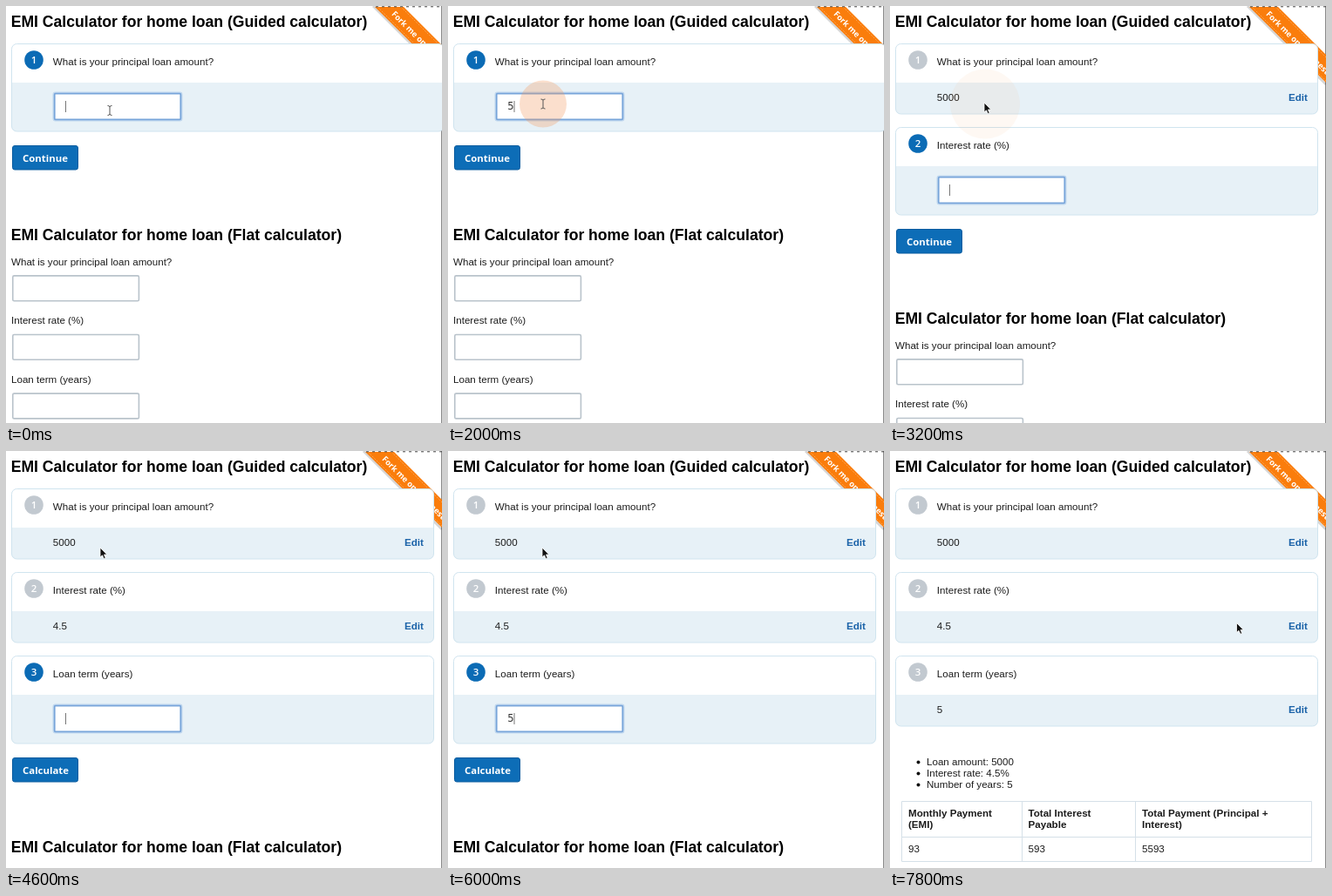
Write an HTML page that moves like this. It is 500 px wide and 479 px high and loops after 8000 ms.

```html
<!DOCTYPE html>
<html lang="en">
<head>
<meta charset="utf-8">
<title>Loan calculator</title>
<style>
  html, body { margin: 0; width: 100%; height: 100%; overflow: hidden; background: #fff; }
  svg { display: block; width: 100%; height: 100%; }
  text { font: 11.6px "Liberation Sans", Arial, sans-serif; fill: #1c1c1c; white-space: pre; }
  .title { font-size: 17.6px; font-weight: 700; fill: #000; }
  .bold { font-weight: 700; }
  .edit { font-weight: 700; fill: #1a62a8; }
  .field { font: 11.5px "DejaVu Sans", sans-serif; fill: #333; }
  .button { font: 700 11.4px "Open Sans", sans-serif; fill: #fff; }
  .badge { font: 600 11.5px "Open Sans", sans-serif; fill: #fff; text-anchor: middle; }
  .ribbon { font: 700 9.3px "Open Sans", sans-serif; fill: #fff; }
</style>
</head>
<body>
<svg id="stage" viewBox="0 0 500 479" xmlns="http://www.w3.org/2000/svg"></svg>
<script>
const LOOP = 8000, TICK = 200, PITCH = 96;
const questions = ["What is your principal loan amount?", "Interest rate (%)", "Loan term (years)"];
const answers = ["5000", "4.5", "5"];
const stepStarts = [0, 3200, 4600, 6400];

// [time, typed text, caret shown]
const typing = [
  [0, "", 1], [600, "", 0], [1200, "", 1], [1600, "", 0], [1800, "", 1],
  [2000, "5", 1], [2200, "50", 1], [2400, "500", 1], [2600, "5000", 1], [3000, "5000", 0],
  [3200, "", 1], [3600, "", 0], [3800, "4", 1], [4000, "4.", 1], [4200, "4.5", 1],
  [4600, "", 1], [5600, "", 0], [6000, "5", 1]
];

const text = (x, y, s, cls = "") => `<text x="${x}" y="${y}" class="${cls}">${s}</text>`;
const rect = (x, y, w, h, attrs) => `<rect x="${x}" y="${y}" width="${w}" height="${h}" ${attrs}/>`;
const path = (d, attrs) => `<path d="${d}" ${attrs}/>`;

function ease(t, from, to) {
  const p = Math.min(1, Math.max(0, (t - from) / (to - from)));
  return p * p * (3 - 2 * p);
}

function ribbon(shift) {
  return `<g transform="translate(${shift} 0)">` +
    path("M421 0 L511 90", 'stroke="#000" stroke-opacity=".16" stroke-width="3"') +
    path("M423 1 H456 L520 65 V97 Z", 'fill="#fa7d0c"') +
    path("M426 1 L520 95 M453 1 L520 68", 'stroke="#ffd3a3" stroke-opacity=".55" stroke-width=".8" stroke-dasharray="2 1.5"') +
    path("M424 .8 H520", 'stroke="#444" stroke-width="1" stroke-dasharray="3 4"') +
    `<text class="ribbon" transform="translate(444 7.5) rotate(45)" dy=".35em">Fork me on Codenest</text></g>`;
}

function panel(i, active, right) {
  const y = 43.5 + i * PITCH, h = active ? 100.5 : 80.5, w = right - 6.5;
  const bottom = y + h, edge = right - 6;
  return rect(6.5, y, w, h, 'rx="6" fill="#fff"') +
    path(`M6.5 ${y + 44.5} H${right} V${bottom - 6} Q${right} ${bottom} ${edge} ${bottom} H12.5 Q6.5 ${bottom} 6.5 ${bottom - 6} Z`, 'fill="#e7f1f7"') +
    rect(6.5, y, w, h, 'rx="6" fill="none" stroke="#d0e4ef"') +
    `<circle cx="32" cy="${y + 18.5}" r="10.8" fill="${active ? "#0b6bb5" : "#c2c9d0"}"/>` +
    text(32, y + 22.6, i + 1, "badge") +
    text(53.8, y + 24, questions[i]) +
    (active ? "" : text(53.8, y + 65.7, answers[i]) + text(457, y + 65.7, "Edit", "edit"));
}

function focusField(i, typed, caret) {
  const y = 100.5 + i * PITCH, x = 68.5 + typed.length * 7.3 + (typed ? .2 : 0);
  return rect(54.5, y - 1, 147, 32, 'rx="2" fill="none" stroke="#a9c9ea" stroke-width="2" stroke-opacity=".6"') +
    rect(55.7, y + .2, 144.6, 29.6, 'rx="1" fill="#fff" stroke="#78a5da" stroke-width="1.8"') +
    text(68.3, y + 18.8, typed, "field") +
    (caret ? path(`M${x} ${y + 8.5} v13`, 'stroke="#777" stroke-width="1"') : "");
}

function button(i, label) {
  const y = 160.5 + i * PITCH;
  return rect(7.5, y, 75, 27.5, 'rx="2.5" fill="#0d6db7" stroke="#0a5c9f"') +
    text(19, y + 18, label, "button");
}

function flatForm(i) {
  const parts = questions.map((q, k) =>
    text(6, 297.8 + k * 67.6, q) +
    rect(7.8, 309.9 + k * 67.6, 144.6, 28.8, 'rx="1.5" fill="#fff" stroke="#b9c3cb" stroke-width="1.6"'));
  return `<g transform="translate(0 ${i * PITCH})">` +
    text(5.7, 268.8, "EMI Calculator for home loan (Flat calculator)", "title") + parts.join("") + "</g>";
}

function results() {
  const bullets = ["Loan amount: 5000", "Interest rate: 4.5%", "Number of years: 5"];
  const columns = [
    [21, "Monthly Payment", "(EMI)", "93"],
    [158.5, "Total Interest", "Payable", "593"],
    [289, "Total Payment (Principal +", "Interest)", "5593"]
  ];
  return bullets.map((b, k) =>
    `<circle cx="32.5" cy="${357.5 + k * 13}" r="2" fill="#111"/>` + text(42, 361 + k * 13, b)).join("") +
    path("M13.5 402.5 H483.5 V471.5 H13.5 Z M13.5 443.5 H483.5 M151.5 402.5 V471.5 M281.5 402.5 V471.5", 'fill="none" stroke="#d5e0e8"') +
    columns.map(([x, a, b, value]) =>
      text(x, 419.5, a, "bold") + text(x, 432.5, b, "bold") + text(x, 461, value)).join("");
}

function clickHalo(t) {
  if (t < 1200 || t > 3600) return "";
  const s = t / 1000 - 2;
  const r = Math.min(40, 27 + 12 * s);
  const alpha = Math.min(.45, .3 * Math.exp(-1.2 * s));
  return `<circle cx="109" cy="112.5" r="${r}" fill="#f0965a" fill-opacity="${alpha}"/>`;
}

function pointer(t) {
  if (t < 3200) {
    const p = ease(t, 0, 1200);
    return path("M-2.5 -5.5 Q0 -5.5 0 -4 Q0 -5.5 2.5 -5.5 M0 -4 V4 M-2.5 5.5 Q0 5.5 0 4 Q0 5.5 2.5 5.5",
      `transform="translate(${119 - 10 * p} ${120 - 7.5 * p})" fill="none" stroke="#555" stroke-width="1"`);
  }
  const p = ease(t, 7000, 7800);
  return path("M0 0 V11 L2.5 8.8 L4.3 12.8 L6.2 12 L4.5 8 H7.8 Z",
    `transform="translate(${108 + 289.5 * p} ${111 + 86.5 * p})" fill="#111" stroke="#fff" stroke-width=".8"`);
}

function draw(t) {
  const step = stepStarts.filter(s => s <= t).length - 1;
  const [, typed, caret] = typing.filter(k => k[0] <= t).pop();
  const right = step ? 490.5 : 502;
  let out = path("M499.5 0 V479", 'stroke="#8a8a8a" stroke-width="1"') + ribbon(step ? -11 : 0) +
    text(5.7, 24.3, "EMI Calculator for home loan (Guided calculator)", "title");
  for (let i = 0; i <= Math.min(step, 2); i++) out += panel(i, i === step, right);
  out += step < 3
    ? focusField(step, typed, caret) + button(step, step === 2 ? "Calculate" : "Continue") + flatForm(step)
    : results();
  return out + clickHalo(t) + pointer(t);
}

const stage = document.getElementById("stage");
const start = performance.now();
let shown = -1;

function frame() {
  const t = Math.floor(((performance.now() - start) % LOOP) / TICK) * TICK;
  if (t !== shown) {
    stage.innerHTML = draw(t);
    shown = t;
  }
  requestAnimationFrame(frame);
}
frame();
</script>
</body>
</html>
```
